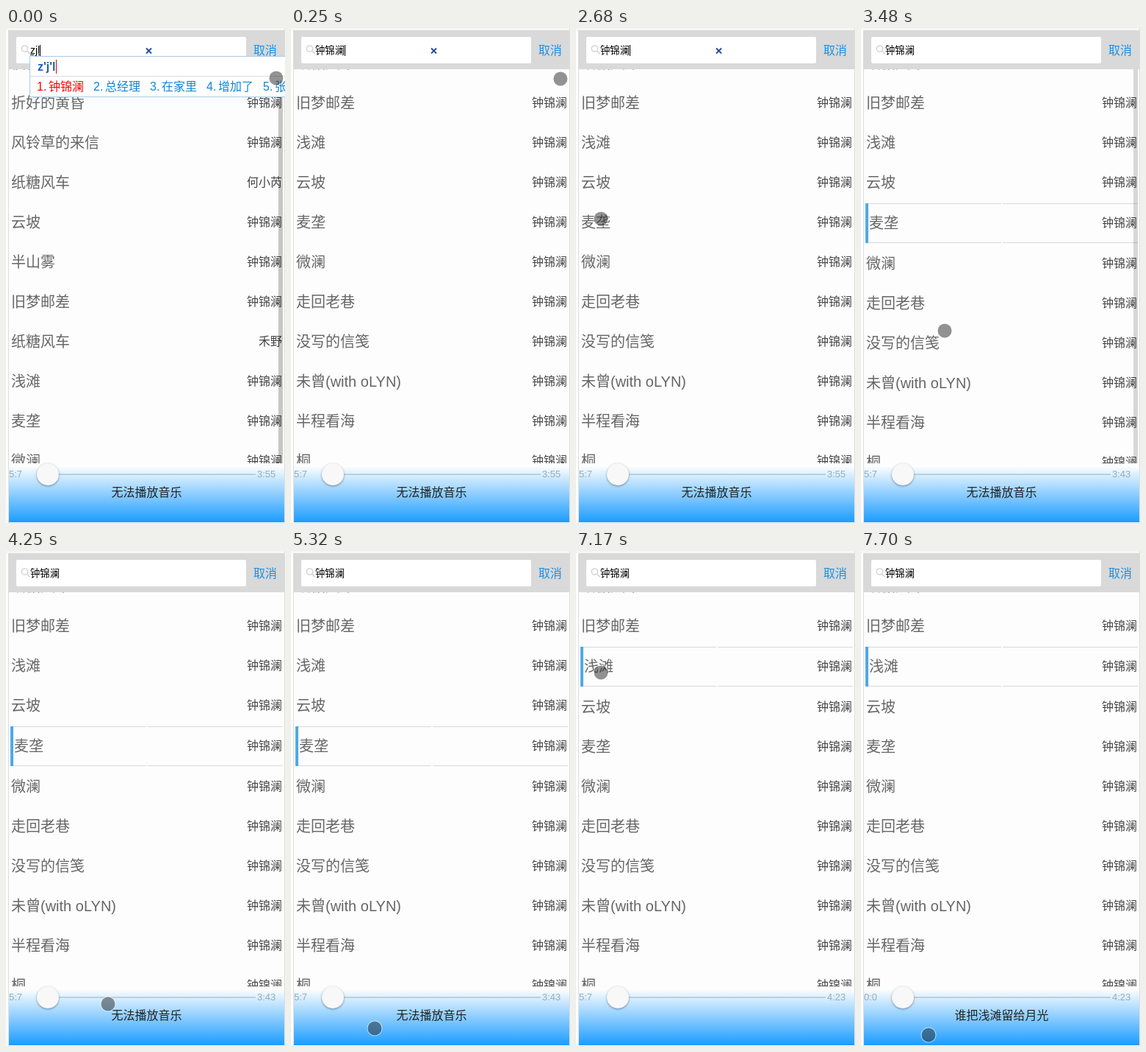
Write an HTML page that moves like this. It is 380 by 672 pixels and loops after 8 s.

```html
<!DOCTYPE html>
<html lang="zh-CN">
<head>
<meta charset="utf-8">
<title>音乐搜索</title>
<style>
html, body { margin: 0; width: 100%; height: 100%; overflow: hidden; background: #fff; }
#stage { position: relative; width: 380px; height: 672px; overflow: hidden; background: #fdfdfd; font-weight: 300;
  font-family: "Liberation Sans", "Noto Sans CJK SC", "Noto Sans CJK", sans-serif; }
#stage * { box-sizing: border-box; white-space: nowrap; }
.abs { position: absolute; }
.frame { inset: 0; border: solid #ddd; border-width: 0 1px 0 0; box-shadow: inset 0 3px #f6f6f6; }
.edge { left: 3px; top: 3px; width: 1px; height: 669px; background: #ddd; }
.head { left: 3px; top: 3px; width: 376px; height: 53px; background: #d9d9d9; }
.box { left: 14px; top: 12px; width: 313px; height: 36px; background: #fff; border-radius: 2px; }
.cancel { left: 337px; top: 18px; font-size: 16px; line-height: 25px; color: #1c90e4; }
#query { left: 33px; top: 21px; font-size: 13.33px; line-height: 19px; color: #000; }
#query.raw { font-size: 14px; text-decoration: underline; }
#caret { top: 23px; width: 1px; height: 15px; background: #000; }
.view { left: 0; top: 56px; width: 379px; height: 535px; overflow: hidden; }
.list { left: 6px; top: -35px; width: 371px; }
.row { position: relative; height: 54px; padding: 0 1px; display: flex; justify-content: space-between;
  font-size: 20px; line-height: 54px; color: #666; }
.row i { font-style: normal; font-size: 16px; color: #444; }
.row.pick { margin: 1px 0; line-height: 52px; border: 1px solid #d9d9d9; border-width: 1px 0; padding-left: 5px; }
.row.pick::before { content: ""; position: absolute; left: 0; top: -1px; width: 4px; height: 54px; background: #4fa9e8; }
.row.pick::after { content: ""; position: absolute; left: 185px; top: -1px; width: 2px; height: 54px; background: #fdfdfd; }
#bar { left: 371px; top: 0; width: 6px; height: 535px; background: #000; }
.player { left: 4px; top: 594px; width: 375px; height: 77px; background: linear-gradient(#fff, #1c9cff); }
.track { left: 57px; top: 605px; width: 283px; height: 2px; background: #b3c9d6; opacity: .8; }
.thumb { left: 42px; top: 591px; width: 30px; height: 30px; border-radius: 50%;
  background: #f8f8f8; box-shadow: 0 1px 3px rgba(0,0,0,.4); }
.time { top: 598px; font-size: 13px; line-height: 16px; color: #94abba; }
#lyric { left: 4px; top: 618px; width: 375px; text-align: center; font-size: 16px; line-height: 25px; color: #222; }
#ime { left: 32px; top: 38px; width: 360px; height: 56px; background: #fff; border: 1px solid #a9cbe4; }
#ime b { left: 10px; top: 3px; font-size: 16px; line-height: 22px; color: #1f5fb8; }
#ime hr { left: 0; top: 26px; width: 100%; height: 1px; margin: 0; border: 0; background: #d4dde4; }
#ime u { left: 35px; top: 4px; width: 1px; height: 19px; background: #e00; }
.word { top: 28px; font-size: 16px; line-height: 25px; color: #0f86d6; }
.word:first-of-type { color: #f00; }
.word span { display: inline-block; width: 16px; }
#dot { left: -9.5px; top: -9.5px; width: 19px; height: 19px; border-radius: 50%;
  background: rgba(40,40,40,.5); box-shadow: 0 0 0 1px rgba(255,255,255,.6); }
</style>
</head>
<body>
<div id="stage">
  <div class="abs frame"></div>
  <div class="abs view">
    <div class="abs list" id="before"></div>
    <div class="abs list" id="after"></div>
    <div class="abs" id="bar"></div>
  </div>
  <div class="abs edge"></div>
  <div class="abs head"></div>
  <div class="abs box"></div>
  <svg class="abs" width="380" height="56" fill="none">
    <g stroke="#cfcfcf" stroke-width="1.3"><circle cx="25.5" cy="28" r="4.2"/><path d="M28.6 31.2l4 4"/></g>
    <path id="clear" d="M191 27.5l7 7m0-7l-7 7" stroke="#2b4f9e" stroke-width="2"/>
  </svg>
  <div class="abs" id="query"></div>
  <div class="abs" id="caret"></div>
  <div class="abs cancel">取消</div>
  <div class="abs player"></div>
  <div class="abs track"></div>
  <div class="abs time" id="now" style="left:4px"></div>
  <div class="abs time" id="total" style="left:342px"></div>
  <div class="abs thumb"></div>
  <div class="abs" id="lyric"></div>
  <div class="abs" id="ime"><b class="abs">z'j'l</b><u class="abs"></u><hr class="abs"></div>
  <div class="abs" id="dot"></div>
</div>
<script>
const $ = id => document.getElementById(id);
const LOOP = 8000, BEATS = 30, LEAD = 50;
const singer = '钟锦澜';
const failed = '无法播放音乐';

function fillList(id, titles, others = {}) {
  $(id).innerHTML = titles.map((title, i) =>
    `<div class="row"><span>${title}</span><i>${others[i] || singer}</i></div>`).join('');
}
fillList('before', ['慢慢走远', '折好的黄昏', '风铃草的来信', '纸糖风车', '云坡', '半山雾',
  '旧梦邮差', '纸糖风车', '浅滩', '麦垄', '微澜'], { 3: '何小芮', 7: '禾野' });
fillList('after', ['纸糖风车', '旧梦邮差', '浅滩', '云坡', '麦垄', '微澜',
  '走回老巷', '没写的信笺', '未曾(with oLYN)', '半程看海', '桐']);
$('ime').insertAdjacentHTML('beforeend', [singer, '总经理', '在家里', '增加了', '张'].map((word, i) =>
  `<div class="abs word" style="left:${9 + 77 * i}px"><span>${i + 1}.</span>${word}</div>`).join(''));

// Beats at which the user confirms the search and picks the two songs.
const SEARCH = 1, FIRST = 11, SECOND = 27;

// Where the pointer comes to rest: beat, x, y.
const stops = [
  [0, 367, 67], [4, 366, 69], [5, 105, 337], [6, 12, 356], [8, 26, 254], [10, 33, 258],
  [13, 113, 410], [16, 138, 614], [19, 106, 618], [20, 113, 647], [22, 128, 644],
  [24, 28, 219], [26, 33, 164], [27, 33, 164], [29, 91, 656]
];
const easeOut = u => 1 - (1 - u) ** 3;

function pointerAt(beat) {
  const next = Math.max(1, stops.findIndex(([b]) => b >= beat));
  const [b0, x0, y0] = stops[next - 1], [b1, x1, y1] = stops[next];
  const k = easeOut((beat - b0) / (b1 - b0));
  return [x0 + (x1 - x0) * k, y0 + (y1 - y0) * k].map(v => Math.round(v) + .5);
}

function songAt(beat) {
  if (beat >= SECOND) return { row: 2, total: '4:23', lyric: beat < SECOND + 2 ? '' : '谁把浅滩留给月光' };
  if (beat >= FIRST) return { row: 4, total: '3:43', lyric: beat < FIRST + 1 ? '' : failed };
  return { row: -1, total: '3:55', lyric: failed };
}

function barOpacity(beat) {
  if (beat < SEARCH) return .22;
  return beat > FIRST ? Math.max(0, .2 * (FIRST + 5 - beat) / 4) : 0;
}

const show = (id, on) => { $(id).style.visibility = on ? 'visible' : 'hidden'; };
const setText = (id, text) => { if ($(id).textContent !== text) $(id).textContent = text; };

function draw(beat) {
  const typing = beat < SEARCH, focused = beat < FIRST;
  const song = songAt(beat);
  show('before', typing);
  show('after', !typing);
  show('ime', typing);
  show('clear', focused);
  show('caret', typing || focused && Math.ceil(beat / 2) % 2);
  $('caret').style.left = typing ? '46px' : '73px';
  $('query').classList.toggle('raw', typing);
  setText('query', typing ? 'zjl' : singer);
  [...$('after').children].forEach((row, i) => row.classList.toggle('pick', i === song.row));
  $('bar').style.opacity = barOpacity(beat);
  setText('now', beat < SECOND + 2 ? '5:7' : '0:0');
  setText('total', song.total);
  setText('lyric', song.lyric);
  const [x, y] = pointerAt(beat);
  $('dot').style.transform = `translate(${x}px, ${y}px)`;
}

const began = performance.now();
function tick() {
  const t = (performance.now() - began) % LOOP;
  draw(Math.min(BEATS - 1, Math.floor((t + LEAD) * BEATS / LOOP)));
  requestAnimationFrame(tick);
}
tick();
</script>
</body>
</html>
```
